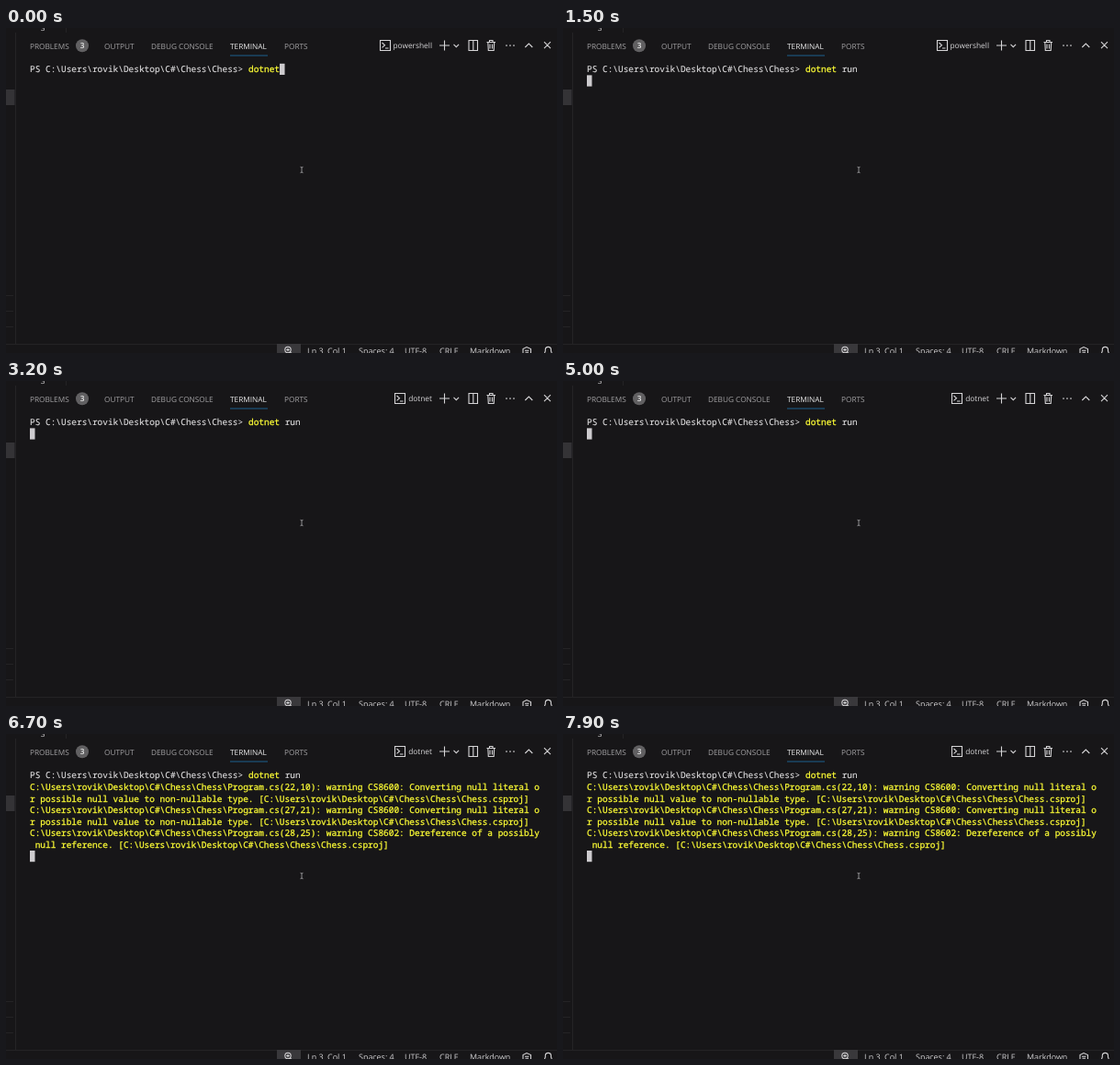
Recreate the animation shown at these times as an HTML page. Size 600 px wide and 354 px high, loop 8 s.

```html
<!DOCTYPE html>
<html lang="en">
<head>
<meta charset="utf-8">
<title>Terminal</title>
<style>
html, body { margin: 0; width: 100%; height: 100%; overflow: hidden; background: #171618; }
svg { display: block; position: absolute; left: 0; top: 0; }
text { white-space: pre; text-rendering: geometricPrecision; }
.ui { font-family: "Open Sans", "Noto Sans", sans-serif; font-size: 8.25px; fill: #a3a2a4; }
.ui .on { fill: #ebebeb; }
.ui .label { font-size: 8.35px; fill: #d6d5d7; }
.status { font-size: 8.95px; fill: #d0cfd1; }
.mono { font-family: "Noto Sans Mono", "DejaVu Sans Mono", monospace; font-size: 9.444px; fill: #e0dfe0; }
.mono text { stroke: #e0dfe0; stroke-width: .12px; }
.mono .yellow { fill: #fdfd35; stroke: #fdfd35; stroke-width: .28px; }
.icon { fill: none; stroke: #d6d5d7; stroke-width: 1.1; }
.edge { fill: none; stroke: #242325; stroke-width: 1; }
</style>
</head>
<body>
<svg width="600" height="354" viewBox="0 0 600 354">
  <rect width="600" height="354" fill="#171618"/>
  <rect y="67" width="9.5" height="17" fill="#343336"/>
  <path class="edge" d="M10.5 5V344M65.5 0V5M0 291.5H8M0 308.5H8M0 325.5H8M0 344.5H600"/>
  <rect x="295" y="344" width="26" height="10" fill="#39383b"/>

  <g class="ui">
    <text x="37.8" y="3" class="label">3</text>
    <text x="26" y="22.6">PROBLEMS</text>
    <text x="107" y="22.6">OUTPUT</text>
    <text x="158" y="22.6">DEBUG CONSOLE</text>
    <text x="244" y="22.6" class="on">TERMINAL</text>
    <text x="303" y="22.6">PORTS</text>
    <circle cx="83" cy="19.3" r="7" fill="#616062"/>
    <text x="83" y="22.3" text-anchor="middle" class="on" font-weight="600">3</text>
    <text id="shell" x="464" y="22.4" text-anchor="end" class="label"></text>
  </g>
  <path d="M244 30H285" stroke="#1c618f"/>

  <g class="icon">
    <path id="shellIcon" d="M.5 13.5H11.5V24.5H.5ZM2.5 16L5.5 18.7L2.5 21.4M6 22H9.5"/>
    <path d="M472 19H483M477.5 13.5V24.5M487.5 17.8L490.3 20.6L493.1 17.8"/>
    <path d="M504 13.5H513.5V24.5H504ZM508.8 13.5V24.5"/>
    <path d="M523.5 15.5H533M526.5 15.5V13.5H530V15.5M524.8 15.5L525.3 24.5H531.2L531.7 15.5M527 17.5V22.5M529.5 17.5V22.5"/>
    <path d="M565.3 21L569.3 17L573.3 21M586 15.2L593 22.2M593 15.2L586 22.2"/>
    <path d="M545 19H545.01M549 19H549.01M553 19H553.01" stroke-width="1.7" stroke-linecap="round"/>
    <circle cx="307" cy="350.5" r="3.2"/>
    <path d="M305.3 350.5H308.7M307 348.8V352.2M309.3 352.8L311 354.5"/>
    <path d="M563 354V349.5L567 347.5L571.5 349.5V354M565 351.3H569.5M565.5 353.3H569"/>
    <path d="M586.5 354L587.3 352V350.5A3.1 3.1 0 0 1 593.5 350.5V352L594.3 354"/>
    <path d="M320.5 151.3Q322 151.3 322 152.3Q322 151.3 323.5 151.3M322 152V157M320.5 157.7Q322 157.7 322 156.7Q322 157.7 323.5 157.7" stroke="#a9a8aa" stroke-width=".8"/>
  </g>

  <g class="ui">
    <g class="status">
      <text x="328" y="354.8">Ln 3, Col 1</text>
      <text x="384" y="354.8">Spaces: 4</text>
      <text x="434" y="354.8">UTF-8</text>
      <text x="472" y="354.8">CRLF</text>
      <text x="505" y="354.8">Markdown</text>
    </g>
  </g>

  <g class="mono">
    <text id="prompt" x="26" y="48.3"></text>
    <text id="command" class="yellow" y="48.3">dotnet</text>
    <text id="argument" y="48.3"></text>
    <g id="warnings"></g>
    <rect id="cursor" width="5.5" height="12.2" fill="#cdcbce"/>
  </g>
</svg>
<script>
const LOOP = 8000, LEFT = 26, CELL = 5.667, ROW = 12.6;
const $ = id => document.getElementById(id);
const dir = String.raw`C:\Users\rovik\Desktop\C#\Chess\Chess`;
const prompt = `PS ${dir}> `;
const source = dir + '\\Program.cs';
const project = `[${dir}\\Chess.csproj]`;
const nullTail = `r possible null value to non-nullable type. ${project}`;
const lines = [
  `${source}(22,10): warning CS8600: Converting null literal o`,
  nullTail,
  `${source}(27,21): warning CS8600: Converting null literal o`,
  nullTail,
  `${source}(28,25): warning CS8602: Dereference of a possibly`,
  ` null reference. ${project}`
];

// Moments at which " run" gains a character
const keys = [100, 600, 700, 900];
const ENTER = 1500, STARTED = 1700, OUTPUT = 6700;

const colX = col => LEFT + col * CELL;
const commandCol = prompt.length, argCol = commandCol + 'dotnet'.length;

$('prompt').textContent = prompt;
$('command').setAttribute('x', colX(commandCol));
$('argument').setAttribute('x', colX(argCol));
lines.forEach((line, i) => {
  const el = document.createElementNS('http://www.w3.org/2000/svg', 'text');
  el.setAttribute('class', 'yellow');
  el.setAttribute('x', LEFT);
  el.setAttribute('y', 48.3 + (i + 1) * ROW);
  el.textContent = line;
  $('warnings').append(el);
});

function draw(t) {
  const typed = keys.filter(k => t >= k).length;
  const started = t >= STARTED, printed = t >= OUTPUT;
  const row = printed ? lines.length + 1 : t >= ENTER ? 1 : 0;
  const col = row ? 0 : argCol + typed;

  $('argument').textContent = ' run'.slice(0, typed);
  $('warnings').style.display = printed ? '' : 'none';
  $('cursor').setAttribute('x', colX(col));
  $('cursor').setAttribute('y', 38.8 + row * ROW);
  $('shell').textContent = started ? 'dotnet' : 'powershell';
  $('shellIcon').setAttribute('transform', `translate(${started ? 423 : 407} 0)`);
}

function tick() {
  draw(performance.now() % LOOP);
  requestAnimationFrame(tick);
}
tick();
</script>
</body>
</html>
```
